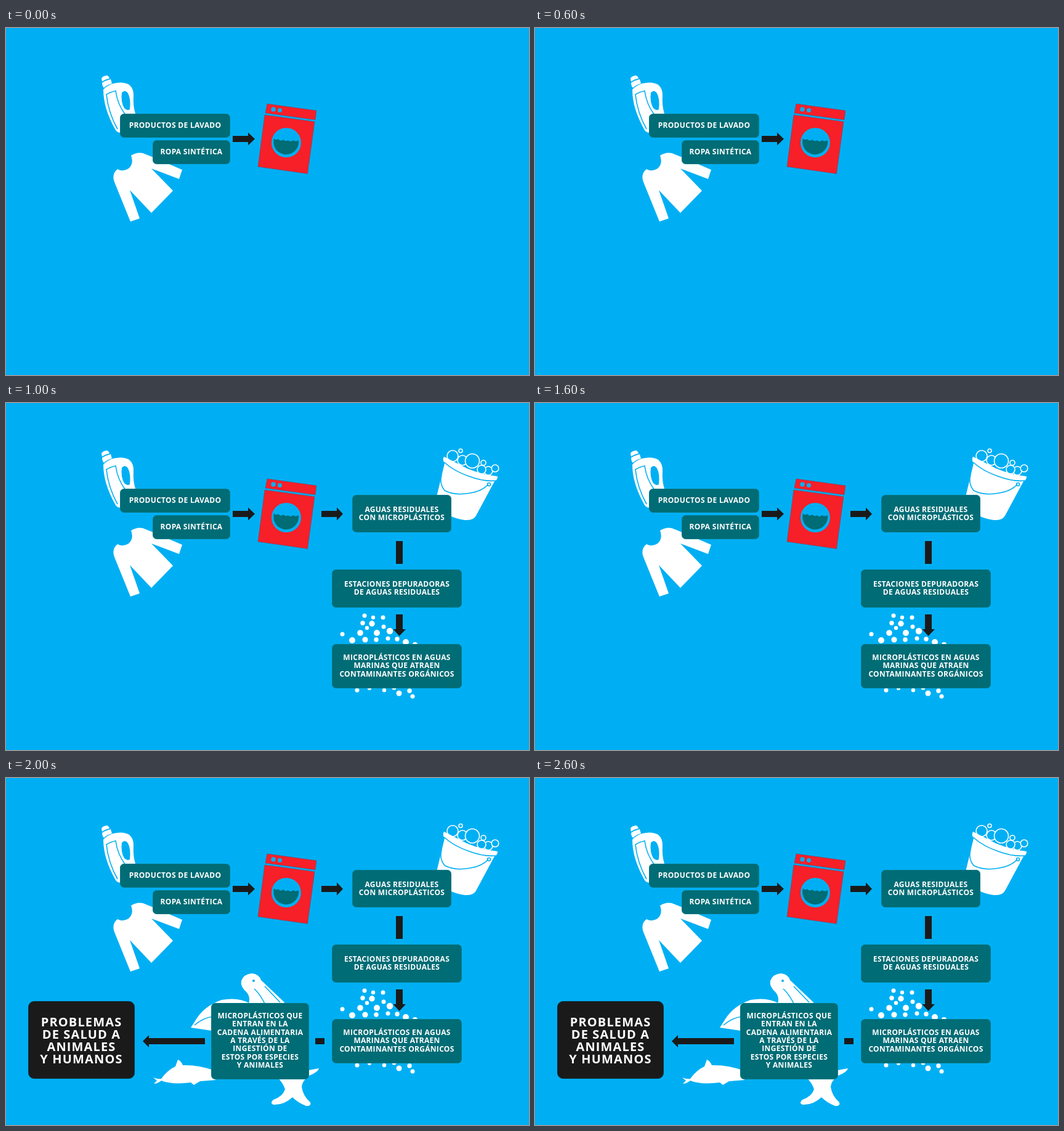
An HTML page for the animation above (3000 ms loop, 849 by 563 pixels).

```html
<!DOCTYPE html>
<html lang="es">
<head>
<meta charset="utf-8">
<title>Microplásticos</title>
<style>
  html, body { margin: 0; width: 100%; height: 100%; overflow: hidden; background: #00aff3; }
  svg { display: block; }
  text { font: 700 12px "Open Sans", "Noto Sans", sans-serif; letter-spacing: .3px; text-anchor: middle; fill: #fff; }
  .big text { font-size: 20px; letter-spacing: 1.15px; }
  .box rect { fill: #006c75; stroke: #087b8b; }
  .big rect { fill: #1b1a1b; stroke: #12303d; }
  .white { fill: #fff; }
  .sky { fill: #00aff3; }
  .cut { fill: none; stroke: #00aff3; stroke-width: 1.6; }
  .foam { fill: #00aff3; stroke: #fff; stroke-width: 1.6; }
  .arrow { fill: #1b1a1b; }
  .red { fill: #f71f28; stroke: #65547d; stroke-width: .8; }
</style>
</head>
<body>
<svg width="849" height="563" viewBox="0 0 849 563">
  <g class="step">
    <g class="white">
      <path d="M155 82Q156 78 164 77Q167 78 168 82Q161 83 156 87Z"/>
      <path d="M156 89Q162 85 170 83L172 90Q164 92 159 97Q156 94 156 89Z"/>
      <path d="M158 100Q164 93 174 90Q190 86 200 92Q208 99 207 111Q206 126 210 139L210 150L190 150L190 169Q181 172 177 164Q158 130 158 100Z"/>
    </g>
    <path class="sky" d="M188 105Q193 99 198 106Q203 115 201 132Q197 135 192 130Q186 120 188 105Z"/>
    <path class="cut" d="M181 164Q166 137 163 108Q169 104 178 102Q181 124 194 141"/>
    <path class="white" d="M203 207Q212 201 222 203L242 211L286 230L281 245L236 228L271 264L236 300L201 263L217 309L202 314L176 250Q171 237 181 229Q190 234 199 228Q208 220 203 207Z"/>

    <path class="red" d="M424 123L504 134L502 149L421 138Z"/>
    <path class="red" d="M420 141L501 152L489.500 236.500L409 225Z"/>
    <g class="sky">
      <circle cx="434" cy="132" r="3.800"/>
      <circle cx="444.500" cy="133.500" r="3.500"/>
      <circle cx="455" cy="186" r="24"/>
    </g>
    <path fill="#006c75" d="M435 179Q438 183 442 180Q446 185 450 181Q454 185 458 182Q462 186 466 182Q470 185 475 182A20.500 20.500 0 1 1 435 179Z"/>
    <path class="arrow" d="M368 175H393V169.500L404 180L393 190.500V185H368Z"/>
  </g>

  <g class="step">
    <path class="arrow" d="M512 175H537V169.500L547 180L537 190.500V185H512Z"/>
    <path class="arrow" d="M633 224H644V261H633Z"/>
    <g class="foam">
      <circle cx="738" cy="77.500" r="3"/>
      <circle cx="725" cy="86" r="9"/>
      <circle cx="741" cy="93" r="8"/>
      <circle cx="757" cy="94" r="11.500"/>
      <circle cx="775" cy="97" r="4"/>
      <circle cx="783" cy="110" r="7"/>
      <circle cx="772" cy="108" r="7"/>
      <circle cx="794" cy="106" r="5.800"/>
    </g>
    <path class="white" d="M711 87Q727 95 748 106Q775 117 798 119Q798 125 793 127L764 181Q760 191 745 190Q730 188 719 182L699 152L712 98Q708 92 711 87Z"/>
    <path class="cut" d="M711 96Q728 111 752 119Q776 128 795 126M707 116Q703 131 712 142Q730 151 754 146Q773 143 783 132"/>
    <circle class="cut" cx="784" cy="132" r="2.500"/>
    <g id="dots" class="white"></g>
    <path class="arrow" d="M633 343H644V367H649L638.500 378L628.500 367H633Z"/>
  </g>

  <g class="step">
    <g class="white">
      <path d="M300 405L309 391Q322 370 350 360Q378 355 396 366L394 410L334 410Z"/>
      <path d="M392 370Q399 357 390 347Q380 338 382 329Q386 318 399 317Q411 318 414 328L452 364L452 372L408 372Z"/>
      <path d="M239 486Q247 489 252 488Q262 474 275 468L279 457Q284 459 287 466Q312 465 340 475V490L315 492L305 498L300 494Q270 498 252 491Q246 496 240 496L245 491Z"/>
      <path d="M508 471Q507 477 492 483Q481 491 480 501Q482 516 494 526Q496 533 487 532Q474 527 465 518Q451 531 434 530Q428 527 434 522Q449 517 453 505Q450 495 440 485L470 465L492 474Z"/>
    </g>
    <path class="cut" d="M306 401Q320 389 336 387M420 338L445 364M403 342Q412 350 420 366"/>
    <circle class="sky" cx="402" cy="329" r="2"/>
    <path class="arrow" d="M222 427L232 417V422H323V432H232V437Z"/>
    <path class="arrow" d="M502 422H517V432H502Z"/>
  </g>
</svg>
<script>
  const LOOP = 3000;
  const NS = "http://www.w3.org/2000/svg";
  const steps = document.querySelectorAll(".step");

  function add(parent, tag, attrs, text = "") {
    const el = document.createElementNS(NS, tag);
    for (const key in attrs) el.setAttribute(key, attrs[key]);
    el.textContent = text;
    return parent.appendChild(el);
  }

  function box(step, [x, y, right, bottom], baseline, lines, big) {
    const g = add(steps[step], "g", { class: big ? "box big" : "box" });
    add(g, "rect", { x: x + .5, y: y + .5, width: right - x - 1, height: bottom - y - 1, rx: big ? 9 : 6 });
    const pitch = big ? 20.2 : 13.35;
    lines.split("|").forEach((line, i) =>
      add(g, "text", { x: (x + right) / 2, y: baseline + i * pitch }, line));
  }

  box(0, [185, 139, 364, 178], 162, "PRODUCTOS DE LAVADO");
  box(0, [238, 182, 364, 221], 205, "ROPA SINTÉTICA");
  box(1, [562, 149, 723, 210], 177, "AGUAS RESIDUALES|CON MICROPLÁSTICOS");
  box(1, [529, 270, 740, 332], 298, "ESTACIONES DEPURADORAS|DE AGUAS RESIDUALES");
  box(1, [529, 391, 740, 463], 417, "MICROPLÁSTICOS EN AGUAS|MARINAS QUE ATRAEN|CONTAMINANTES ORGÁNICOS");
  box(2, [333, 365, 492, 489], 390, "MICROPLÁSTICOS QUE|ENTRAN EN LA|CADENA ALIMENTARIA|A TRAVÉS DE LA|INGESTIÓN DE|ESTOS POR ESPECIES|Y ANIMALES");
  box(2, [36, 362, 209, 488], 402.5, "PROBLEMAS|DE SALUD A|ANIMALES|Y HUMANOS", true);

  const dots = [
    [582, 345, 3.5], [596, 348, 3.2], [612, 348, 3.5], [579, 357, 3.7], [594, 358, 4.7],
    [586, 365, 3.2], [613, 363, 3.5], [575, 373, 4.8], [602, 373, 5], [623, 370, 5.2],
    [546, 375, 3.5], [562, 385, 5], [583, 384, 4.6], [601, 384, 3.7], [620, 382, 3.5],
    [635, 383, 3.7], [649, 388, 5], [664, 392, 4], [570, 466, 3.5], [590, 463, 3],
    [614, 466, 3.2], [630, 462, 3.5], [638, 471, 4.5], [655, 467, 3.7], [660, 476, 3.5]
  ];
  const cloud = document.getElementById("dots");
  for (const [cx, cy, r] of dots) add(cloud, "circle", { cx, cy, r });

  // Each step appears one second after the last and stays until the loop restarts.
  steps.forEach((step, i) => {
    if (!i) return;
    step.animate([
      { opacity: 0, offset: 0, easing: "step-end" },
      { opacity: 1, offset: i / steps.length, easing: "step-end" },
      { opacity: 1, offset: 1 }
    ], { duration: LOOP, iterations: Infinity });
  });
</script>
</body>
</html>
```
